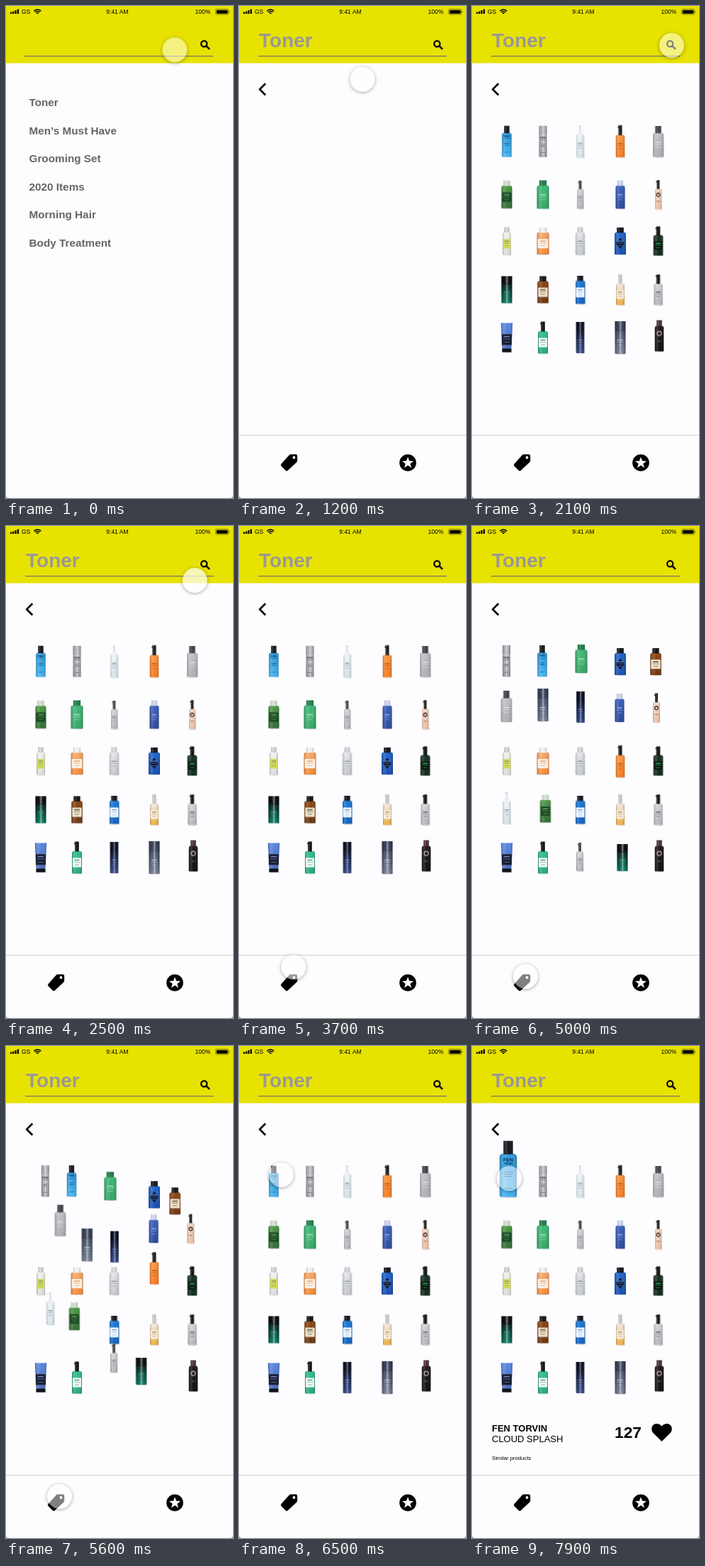
An HTML page that plays this animation: 320x693 px, repeating every 8 s.

```html
<!DOCTYPE html>
<html lang="en">
<head>
<meta charset="utf-8">
<title>Toner search</title>
<style>
html, body { margin: 0; width: 100%; height: 100%; overflow: hidden; background: #888; }
#stage {
  position: relative; width: 320px; height: 693px; overflow: hidden;
  background: #fdfcfe; border-radius: 0 0 4px 4px;
  font-family: "Liberation Sans", Arial, Helvetica, sans-serif;
}
svg { position: absolute; left: 0; top: 0; }
.anim, #cursor { animation: 8s linear infinite; }

#cursor {
  position: absolute; left: -17.5px; top: -17.5px; width: 35px; height: 35px;
  border-radius: 50%; box-shadow: 0 1px 5px rgba(0, 0, 0, .36);
  animation-name: point;
}
@keyframes point {
  0% { transform: translate(238px, 61px); background: #ffffff80; animation-timing-function: ease-out; }
  6.25%, 10% { transform: translate(54px, 137px); background: #ffffff80; animation-timing-function: ease-in; }
  15% { transform: translate(173px, 103px); background: #ffffffa0; animation-timing-function: ease-out; }
  20%, 28.75% { transform: translate(281px, 55px); background: #ffffff80; animation-timing-function: ease-in; }
  31.25% { transform: translate(266px, 75px); background: #ffffffb4; animation-timing-function: ease-out; }
  42.5%, 45% { transform: translate(78px, 607px); background: #ffffffb4; animation-timing-function: ease-in-out; }
  47.5%, 75% { transform: translate(75px, 634px); background: #ffffff80; animation-timing-function: ease-in-out; }
  81.25% { transform: translate(59px, 181px); background: #ffffff80; animation-timing-function: ease-out; }
  83.75%, 100% { transform: translate(52px, 186px); background: #ffffff80; }
}

.menu { animation-name: leave; }
@keyframes leave { 0%, 7.5% { opacity: 1; } 11%, 100% { opacity: 0; } }
.page { animation-name: enter; }
@keyframes enter { 0%, 8.5% { opacity: 0; } 12%, 100% { opacity: 1; } }
.shelf { animation-name: stock; }
@keyframes stock { 0%, 21.5% { opacity: 0; } 25.5%, 100% { opacity: 1; } }
.info { animation-name: reveal; }
@keyframes reveal { 0%, 89.5% { opacity: 0; } 95%, 100% { opacity: 1; } }

.title { animation-name: title; }
@keyframes title {
  0%, 7.5% { transform: translate(32.5px, 141px) scale(.545); fill: #666; animation-timing-function: ease-in-out; }
  12%, 100% { transform: translate(28px, 58px) scale(1); fill: #999994; }
}
.rule { animation-name: rule; }
@keyframes rule { 0%, 7.5% { transform: translate(-1px); } 12%, 100% { transform: none; } }

.item { animation-name: sort; }
@keyframes sort {
  0%, 47.5% { transform: translate(var(--x), var(--y)); animation-timing-function: ease-in-out; }
  55%, 68.125% { transform: translate(var(--sx), var(--sy)); animation-timing-function: ease-in-out; }
  75.625%, 100% { transform: translate(var(--x), var(--y)); }
}
.zoom { animation-name: zoom; }
@keyframes zoom {
  0%, 85% { transform: none; animation-timing-function: ease-in-out; }
  92.5%, 100% { transform: translate(2px, -17.5px) scale(1.8); }
}
</style>
</head>
<body>
<div id="stage">
<svg width="320" height="693" viewBox="0 0 320 693">
  <defs>
    <linearGradient id="shade">
      <stop offset="0" stop-color="#000" stop-opacity=".2"/>
      <stop offset=".25" stop-color="#fff" stop-opacity=".16"/>
      <stop offset=".6" stop-color="#fff" stop-opacity="0"/>
      <stop offset="1" stop-color="#000" stop-opacity=".22"/>
    </linearGradient>
    <linearGradient id="gloss">
      <stop offset="0" stop-color="#000" stop-opacity=".35"/>
      <stop offset=".3" stop-color="#000" stop-opacity=".1"/>
      <stop offset=".52" stop-color="#fff" stop-opacity=".5"/>
      <stop offset=".72" stop-color="#000" stop-opacity=".08"/>
      <stop offset="1" stop-color="#000" stop-opacity=".4"/>
    </linearGradient>
  </defs>

  <rect width="320" height="80.5" fill="#e8e200"/>
  <g font-size="8.5">
    <path d="M6 11V8.5h2.2V11zM9.3 11V7.4h2.2V11zM12.6 11V6h2.2V11zM15.9 11V4.4h2.2V11z"/>
    <text x="22" y="11">GS</text>
    <g fill="none" stroke="#000" stroke-width="1.4">
      <path d="M39.3 7.1Q44.3 2.9 49.3 7.1M41.1 8.9Q44.3 6.2 47.5 8.9"/>
    </g>
    <path d="M42.6 9.9Q44.3 8.6 46 9.9L44.3 11.6z"/>
    <text x="141.3" y="11">9:41 AM</text>
    <text x="266.5" y="11">100%</text>
    <rect x="295.4" y="4.4" width="18.4" height="7.6" rx="2" fill="none" stroke="#000" stroke-opacity=".6" stroke-width=".7"/>
    <rect x="296.7" y="5.7" width="15.8" height="5" rx="1"/>
    <path d="M314.7 6.8q1.5 1.4 0 2.8z"/>
  </g>
  <path class="anim rule" d="M27 70.6H293" stroke="#77746a" stroke-width="1.1"/>
  <g fill="none" stroke="#000" stroke-width="2.2">
    <circle cx="279.2" cy="53.2" r="4.1"/>
    <path d="M282.2 56.2l4 4" stroke-width="2.6" stroke-linecap="round"/>
  </g>

  <g id="menu" class="anim menu" font-size="15.3" font-weight="bold" fill="#666"></g>
  <text class="anim title" font-size="28" font-weight="bold">Toner</text>

  <g class="anim page">
    <path d="M37.3 109.3L29.2 117.4L37.3 125.5" fill="none" stroke="#000" stroke-width="2.7" stroke-linejoin="round"/>
    <path d="M0 604.5H320" stroke="#d2d1d5"/>
    <g transform="translate(-.4 -.3)">
      <path d="M73 631.8H80.5Q82.6 631.8 82.6 634V640.5Q82.6 642 81.5 643L69.2 654.5Q67.7 656 66.2 654.5L60 648.2Q58.6 646.7 60 645.2L71.4 632.5Q72 631.8 73 631.8Z"/>
      <circle cx="77.9" cy="636.3" r="1.9" fill="#fff"/>
    </g>
    <circle cx="238" cy="643.4" r="11.8"/>
    <path id="star" fill="#fff"/>
  </g>

  <g id="shelf" class="anim shelf"></g>

  <g class="anim info" font-size="13">
    <text x="28" y="543" font-weight="bold">FEN TORVIN</text>
    <text x="28" y="558">CLOUD SPLASH</text>
    <text x="28" y="582.5" font-size="7.7">Similar products</text>
    <text x="201" y="552" font-size="22.8" font-weight="bold">127</text>
    <path d="M267.5 557L255.4 545C251.8 541 253 535 256.6 533C260.4 531 264.5 532.2 267.5 535.4C270.5 532.2 274.6 531 278.4 533C282 535 283.2 541 279.6 545Z"/>
  </g>
</svg>
<div id="cursor"></div>
</div>

<script>
const el = id => document.getElementById(id);

el("menu").innerHTML = ["Men’s Must Have", "Grooming Set", "2020 Items", "Morning Hair", "Body Treatment"]
  .map((name, i) => `<text x="32.5" y="${180.5 + i * 39.5}">${name}</text>`).join("");

el("star").setAttribute("d", "M" + Array.from({ length: 10 }, (_, i) => {
  const a = i * Math.PI / 5, r = i % 2 ? 3.5 : 8.4;
  return [238 + r * Math.sin(a), 643.6 - r * Math.cos(a)].map(n => n.toFixed(2));
}).join("L") + "Z");

// cap height and width as fractions of the bottle, shoulder radius
const kinds = {
  screw: [.23, .54, 3.4], short: [.18, .6, 3.2], spray: [.3, .4, 3],
  pump: [.28, .3, 2.5], tall: [.3, 1, .6], tube: [.12, .8, 1]
};

// kind, width, height, body top, body bottom, cap, label, ink
const bottles = [
  ["screw", 13.6, 44, "#2a9ade", "#42b3f0", "#14161c", "name", "#0b2c50"],
  ["tall", 11, 44, "#d5d8dc", "#b6bbc3", "#c9ccd2", "name", "#30353f"],
  ["pump", 11, 45, "#eff4f6", "#d6e2e8", "#eceff1", "", "#5b7f98"],
  ["spray", 12.5, 45, "#fb9440", "#f7761a", "#1d1b1b", "", "#8d4a1d"],
  ["screw", 15.5, 44, "#bfc2c5", "#aaadb0", "#3f4246", "", "#eceded"],
  ["short", 15, 39, "#4f9a45", "#2c6a30", "#cfe0cd", "#1d4a28", "#86bd70"],
  ["short", 17, 40, "#3db873", "#35a565", "#1f7c49", "", "#d5f2de"],
  ["spray", 10, 40, "#d3d5d7", "#b1b4b7", "#4a4d50", "", "#70757b"],
  ["short", 13, 40, "#3a5fbd", "#274596", "#cdd8ee", "", "#b5c8f0"],
  ["spray", 10, 41, "#f3d8c6", "#ecbea0", "#292422", "badge", "#2c211e"],
  ["short", 12, 39, "#f1f1f0", "#dcdddc", "#d2d3d2", "#cfdb56", "#7d8268"],
  ["short", 17, 38, "#f7a868", "#f58a36", "#f1f0ee", "#faf0e6", "#e08a4a"],
  ["short", 13, 39, "#e2e5e8", "#c3c8cd", "#d4d7da", "", "#7d868e"],
  ["short", 16, 38, "#1d64d0", "#124cb0", "#101319", "diamond", "#6f9ade"],
  ["spray", 13.5, 41, "#14301f", "#0d2818", "#0b0c0b", "#101a14", "#2fd468"],
  ["tall", 15, 38, "#12302c", "#0f9274", "#0e1514", "", "#3cb394"],
  ["short", 15.5, 38, "#8c4715", "#6b330f", "#121110", "#f0e4ca", "#1f1b18"],
  ["short", 14, 40, "#1878d8", "#125fbe", "#101318", "#f6f8fb", "#3a80cc"],
  ["spray", 12, 43, "#f1ece2", "#eeaa38", "#c9cac9", "#f4ecdc", "#a97c37"],
  ["spray", 12.5, 43, "#d3d5d7", "#b3b6b9", "#121314", "", "#3e4246"],
  ["tube", 16.5, 41, "#5a85e2", "#4465b8", "#101219", "#1c2233", "#7f9ee6"],
  ["spray", 14, 45, "#30bd8d", "#27a87c", "#0f1211", "#eef6f2", "#3c8c70"],
  ["tall", 11.5, 44, "#121a38", "#40599f", "#0d132a", "", "#7f90c4"],
  ["tall", 15, 46, "#555f7a", "#8a94ac", "#434c66", "", "#c3cad8"],
  ["short", 12.5, 44, "#1b1617", "#0d0b0c", "#4f3038", "badge", "#b9aaac"]
];

const cols = [49, 100, 152.5, 209, 262.5];
const rows = [190.5, 265.5, 331, 399.5, 467];
const sorted = {
  0: [99, 190], 1: [48.5, 190], 2: [49, 397], 3: [209, 331.5], 4: [48.5, 254],
  5: [103.5, 398], 6: [154, 187], 7: [152, 466], 8: [208, 256], 9: [260, 256],
  13: [209, 191], 15: [212, 467], 16: [259, 191], 22: [153, 255], 23: [100, 252]
};

const rect = (x, y, w, h, fill, rx = 0) =>
  `<rect x="${x}" y="${y}" width="${w}" height="${h}" rx="${rx}" fill="${fill}"/>`;
const bar = (y, w, h, fill) => rect(-w / 2, y, w, h, fill);
const word = (y, size, fill, text) =>
  `<text y="${y}" font-size="${size}" font-weight="bold" text-anchor="middle" fill="${fill}">${text}</text>`;

function marks(w, top, h, label, ink) {
  if (label === "name") {
    return word(top + h * .18, 3.9, ink, "FEN") + word(top + h * .25, 1.9, ink, "TORVIN")
      + [.42, .47, .52, .8].map(f => bar(top + h * f, w * .5, .4, ink)).join("");
  }
  if (label === "badge") {
    return `<circle cy="${top + h * .3}" r="${w * .24}" fill="none" stroke="${ink}" stroke-width="1.3"/>`
      + bar(top + h * .6, w * .5, .5, ink);
  }
  let out = "";
  if (label === "diamond") {
    const mid = top + h * .5, r = w * .42;
    out += `<path d="M0 ${mid - r * 1.3}L${r} ${mid}L0 ${mid + r * 1.3}L${-r} ${mid}Z" fill="#101c3a" stroke="${ink}" stroke-width=".5"/>`;
  } else if (label) {
    out += bar(top + h * .3, w * .86, h * .42, label);
  }
  return out + bar(top + h * .38, w * .5, 1.1, ink)
    + bar(top + h * .48, w * .6, .5, ink) + bar(top + h * .6, w * .4, .5, ink);
}

function draw([kind, w, h, light, dark, cap, label, ink], id) {
  const [capH, capW, r] = kinds[kind];
  const x = w / 2, end = h / 2, top = -end + h * capH, cw = w * capW;
  const foot = x * .75;
  const shine = `url(#${kind === "tall" ? "gloss" : "shade"})`;
  const body = kind === "tube"
    ? `M${-x} ${-end}H${x}L${foot} ${end}H${-foot}Z`
    : `M${-x} ${end - 1}V${top + r}Q${-x} ${top} ${r - x} ${top}H${x - r}Q${x} ${top} ${x} ${top + r}V${end - 1}Q${x} ${end} ${x - 1} ${end}H${1 - x}Q${-x} ${end} ${-x} ${end - 1}Z`;
  let lid = bar(-end, cw, h * capH + .5, cap) + bar(-end, cw, h * capH, shine);
  if (kind === "pump") {
    lid = rect(-5, -end, 7, 2, cap, 1) + bar(-end, 1.8, h * capH, "#cfd6da") + bar(top - 5, w * .55, 5.5, cap);
  } else if (kind === "spray") {
    lid += rect(-cw / 2 - 1.2, -end + 2, 2, 1.6, cap);
  } else if (kind === "tube") {
    lid = bar(end - h * capH, w * .78, h * capH, cap);
  }
  return `<linearGradient id="b${id}" x2="0" y2="1"><stop stop-color="${light}"/><stop offset="1" stop-color="${dark}"/></linearGradient>
    <ellipse cx="1" cy="${end}" rx="${x}" ry=".9" fill="#000" opacity=".16"/>
    <path d="${body}" fill="url(#b${id})"/><path d="${body}" fill="${shine}"/>${lid}${marks(w, top, end - top, label, ink)}`;
}

el("shelf").innerHTML = bottles.map((b, i) => {
  const home = i === 24 ? [264, 464.5] : [cols[i % 5], rows[Math.floor(i / 5)]];
  const [x, y] = home, [sx, sy] = sorted[i] || home;
  return `<g class="anim item" style="--x:${x}px;--y:${y}px;--sx:${sx}px;--sy:${sy}px">
    <g class="${i ? "" : "anim zoom"}">${draw(b, i)}</g></g>`;
}).join("");
</script>
</body>
</html>
```
